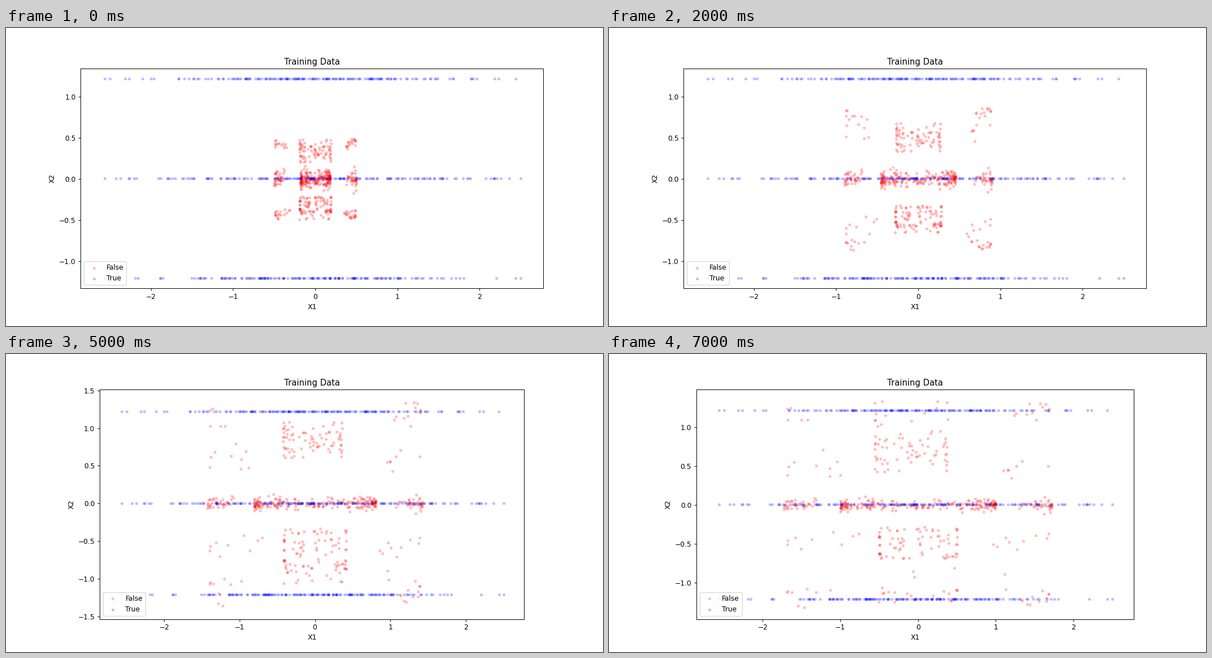
Recreate the animation shown at these times as a matplotlib script. Size 1058 by 529 pixels, loop 8 s.

```python
import numpy as np
import matplotlib.pyplot as plt
from matplotlib.animation import FuncAnimation

FRAMES = 8
KEYS = [0, 2, 5, 7]
ROWS = [1.2225, .005, -1.212]

rng = np.random.default_rng(12)


def real_row(y, count=165, reach=2.56):
    """A bell-shaped row of samples that ends at the given reach."""
    x = rng.normal(size=count)
    return np.column_stack([x * reach / np.abs(x).max(), np.full(count, y)])


def latent(count):
    """A uniform, an arcsine and a normal coordinate for each sample."""
    u = rng.random(count)
    return u, np.sin(np.pi * (rng.random(count) - .5)), rng.normal(size=count)


def spread(v, t, split, low, main, tail, high):
    """Spread v over two bands whose four ends move between key times."""
    ends = [np.interp(t, KEYS, path) for path in (low, main, tail, high)]
    return np.interp(v, [0, split, split + .02, 1], ends)


def edge(t):
    return .5 + .21 * t - .005 * t**2


def band_height(n, t):
    return (.055 - .0025 * t) * n


def core(z, t):
    u, arc, n = z
    return (.18 + .145 * t - .004 * t**2) * arc, band_height(n, t)


def flank(z, t, side):
    u, arc, n = z
    return side * edge(t) * (1 - .28 * u**2), band_height(n, t)


def top(z, t):
    u, arc, n = z
    x = (.19 + .04 * t) * arc - .03 * max(t - 4, 0)
    return x, spread(u, t, .8, (.2, .33, .6, .42), (.4, .57, .94, .87),
                     (.4, .57, .95, .95), (.48, .68, 1.08, 1.35))


def bottom(z, t):
    u, arc, n = z
    x = (.19 + .045 * t) * arc
    return x, -spread(u, t, .8, (.21, .32, .33, .28), (.4, .57, .85, .7),
                      (.4, .57, .87, 1.1), (.5, .66, 1.07, 1.26))


def corner(z, t, side, sign):
    u, arc, n = z
    inset = (.3 + .02 * t) * (1.3 - u) * arc**2
    y = spread(u, t, .5, (.37, .45, .42, .34), (.43, .76, .72, .58),
               (.43, .76, 1, 1.08), (.49, .87, 1.37, 1.33))
    return side * edge(t) * (.98 - inset), sign * y


CLUSTERS = [(core, latent(215), ()), (top, latent(78), ()), (bottom, latent(100), ())]
CLUSTERS += [(flank, latent(38), (side,)) for side in (-1, 1)]
CLUSTERS += [(corner, latent(18 + 2 * side - 2 * sign), (side, sign))
             for side in (-1, 1) for sign in (-1, 1)]


def generated_samples(t):
    return np.hstack([place(z, t, *args) for place, z, args in CLUSTERS]).T


fig, ax = plt.subplots(figsize=(12, 6), dpi=88.16667)
style = dict(s=10, alpha=.2)
fake = ax.scatter([], [], c="red", label="False", **style)
real = np.vstack([real_row(y) for y in ROWS])
ax.scatter(*real.T, c="blue", label="True", **style)
ax.set(title="Training Data", xlabel="X1", ylabel="X2", xlim=(-2.855, 2.776))
ax.set_aspect("equal", adjustable="box")
ax.legend(loc="lower left")


def update(frame):
    fake.set_offsets(generated_samples(frame))
    # The view widens once samples pass the outer rows.
    times = [3, 4, 5, 6, 7]
    low = np.interp(frame, times, [ROWS[-1], -1.236, -1.4, -1.404, -1.339])
    high = np.interp(frame, times, [ROWS[0], ROWS[0], 1.371, 1.349, 1.352])
    margin = .05 * (high - low)
    ax.set_ylim(low - margin, high + margin)
    return fake,


anim = FuncAnimation(fig, update, frames=FRAMES, interval=1000, repeat=True)
plt.show()
```
